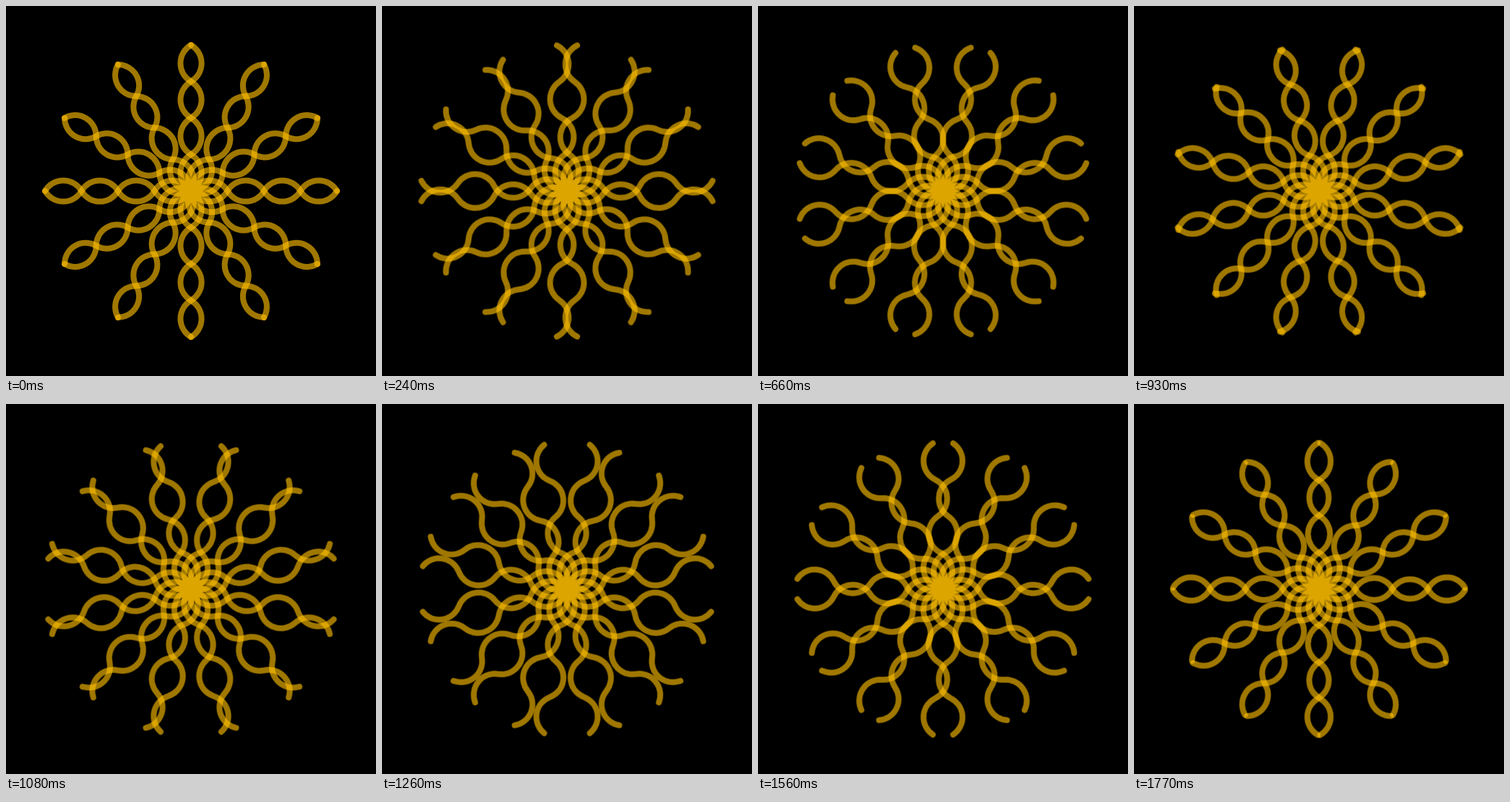
Recreate the animation shown at these times as an HTML page. Size 512 by 512 pixels, loop 1800 ms.

```html
<!DOCTYPE html>
<html lang="en">
<head>
<meta charset="utf-8">
<title>Counter-rotating waves</title>
<style>
  html, body { margin: 0; width: 100%; height: 100%; overflow: hidden; background: #000; }
  svg { display: block; width: 100vw; height: 100vh; }
  .set {
    fill: none;
    stroke: #ffbf00;
    stroke-width: 8;
    stroke-linecap: round;
    stroke-linejoin: round;
    opacity: .63;
  }
  /* One arm spacing per loop, in 30 ms steps */
  .spin { animation: spin 1.8s steps(60) infinite; }
  @keyframes spin { to { transform: rotate(30deg); } }
</style>
</head>
<body>
<svg viewBox="-256 -256 512 512">
  <g class="set"><path class="spin"/></g>
  <g class="set" transform="scale(-1 1)"><path class="spin"/></g>
</svg>
<script>
  const ARMS = 12, RADIUS = 202, ARCS = 4;
  const CHORD = RADIUS / ARCS;
  const ARC_RADIUS = CHORD / Math.sqrt(3); // each arc spans 120 degrees

  // A wave of alternating arcs through the centre, turned to the given angle
  function strand(angle) {
    const at = r => `${(r * Math.sin(angle)).toFixed(3)} ${(-r * Math.cos(angle)).toFixed(3)}`;
    let d = 'M' + at(-RADIUS);
    for (let i = -ARCS; i < ARCS; i++) {
      d += `A${ARC_RADIUS} ${ARC_RADIUS} 0 0 ${i & 1} ${at((i + 1) * CHORD)}`;
    }
    return d;
  }

  // One path per set, so strands of the same set do not add up
  let d = '';
  for (let i = 0; i < ARMS / 2; i++) d += strand(i * 2 * Math.PI / ARMS);
  for (const path of document.querySelectorAll('.spin')) path.setAttribute('d', d);
</script>
</body>
</html>
```
